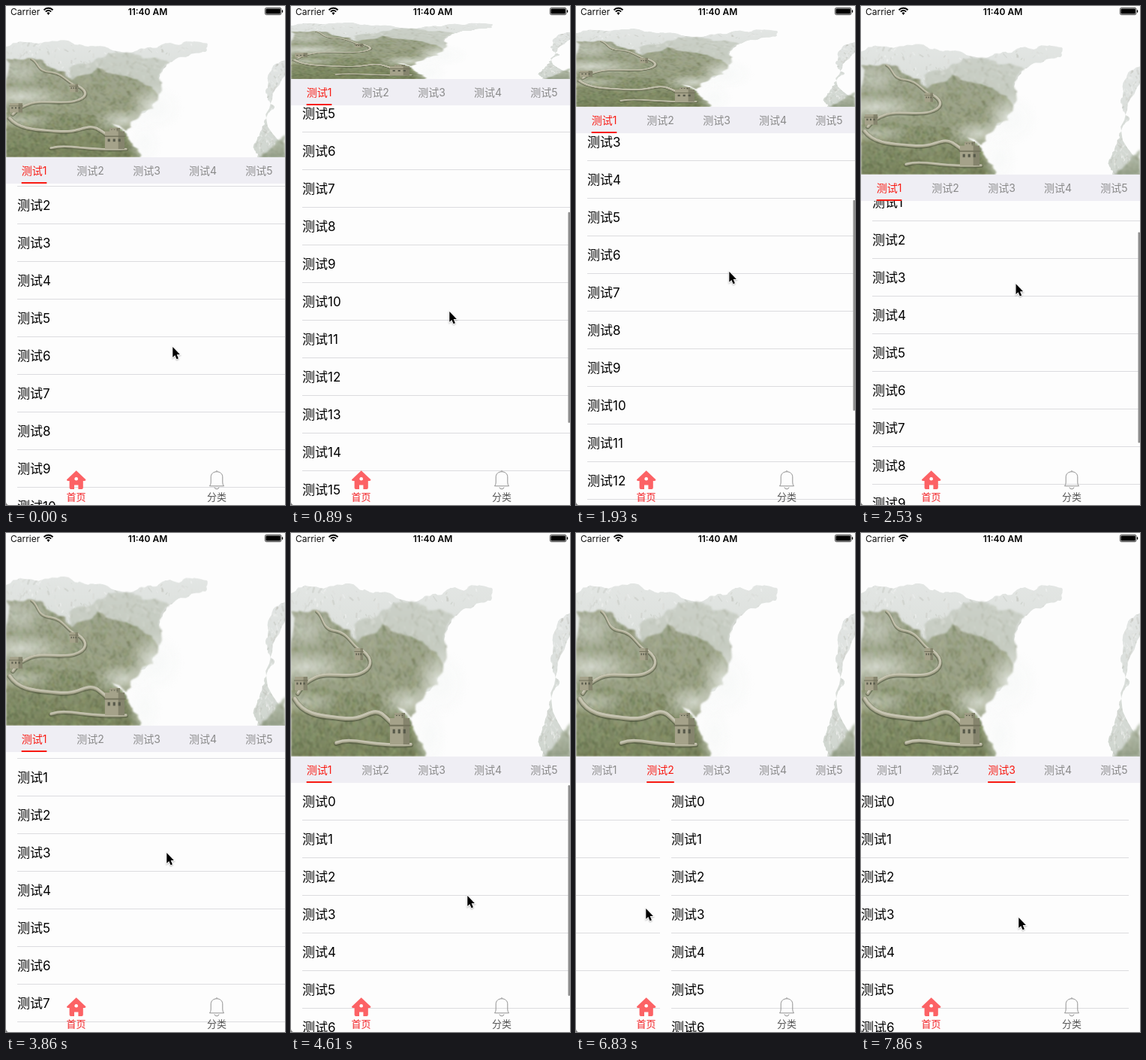
An HTML page with a canvas that plays this animation: 372x663 px, repeating every 8000 ms.

```html
<!DOCTYPE html>
<html lang="zh-CN">
<head>
<meta charset="utf-8">
<style>
html, body { margin: 0; width: 372px; height: 663px; overflow: hidden; background: #fdfdfd; }
canvas { display: block; }
</style>
</head>
<body>
<canvas id="stage" width="372" height="663"></canvas>
<script>
const W = 372, HT = 663, LOOP = 8000, STEP = 148.4;
const HEAD = 297, HEAD_MIN = 97, BAR = 35, ROW = 50, ROWS = 20, PAGES = 3;
const FONT = 'Inter, "Noto Sans CJK SC", "Noto Sans CJK", sans-serif';
const BG = '#fdfdfd', RED = '#f81a12';
const ctx = document.getElementById('stage').getContext('2d');

// resting points of the list and of the hand: step, then values
const SCROLL = [[0, 96.5], [6, 264], [13, 163], [19, 41.5], [26, 41.5], [31, 0]];
const POINTER = [[0, 222, 453], [6, 211, 406], [13, 204, 353], [26, 214, 425], [31, 235, 482],
  [34, 115, 485], [39, 211, 482], [44, 264, 524], [46, 93, 499], [52, 226, 514], [53, 210, 511]];
const FLICKS = [32, 44, 52.3];

function at(keys, k, i = 1) {
  const n = keys.findIndex(key => key[0] >= k);
  if (n < 0) return keys[keys.length - 1][i];
  if (n === 0) return keys[0][i];
  const a = keys[n - 1], b = keys[n], u = (k - a[0]) / (b[0] - a[0]);
  return a[i] + (b[i] - a[i]) * u * u * (3 - 2 * u);
}

// a page flick: slow pull, quick throw, soft landing
const flick = n => n <= 0 ? 0 : 1 / (1 + Math.exp(-3.1 * (n - 1.73)));

function rect(x, y, w, h, color) {
  ctx.fillStyle = color;
  ctx.fillRect(x, y, w, h);
}

function text(s, x, y, size, color, align = 'left', weight = 400) {
  ctx.font = `${weight} ${size}px ${FONT}`;
  ctx.textAlign = align;
  ctx.fillStyle = color;
  ctx.fillText(s, x, y);
}

function sheet() {
  const cv = document.createElement('canvas');
  cv.width = W;
  cv.height = HEAD;
  return cv.getContext('2d');
}

function paintScene() {
  const g = sheet();
  let seed = 41;
  const rnd = () => (seed = (seed * 16807) % 2147483647) / 2147483647;

  // outline roughened by repeated midpoint displacement
  function rough(pts, amount) {
    for (let pass = 0; pass < 4; pass++) {
      pts = pts.flatMap(([x, y], i) => {
        const [nx, ny] = pts[(i + 1) % pts.length];
        const d = amount * Math.hypot(nx - x, ny - y);
        return [[x, y], [(x + nx) / 2 + (rnd() - .5) * d, (y + ny) / 2 + (rnd() - .5) * d]];
      });
    }
    const p = new Path2D();
    pts.forEach(([x, y]) => p.lineTo(x, y));
    p.closePath();
    return p;
  }

  function hill(pts, { top, bottom, light, sat, dabs, blur = .6 }) {
    const l = sheet();
    const ys = pts.map(p => p[1]), y0 = Math.min(...ys), y1 = Math.max(...ys);
    const xs = pts.map(p => p[0]), x0 = Math.min(...xs), x1 = Math.max(...xs);
    const fill = l.createLinearGradient(0, y0, 0, y1);
    fill.addColorStop(0, top);
    fill.addColorStop(1, bottom);
    const path = rough(pts, .32);
    l.fillStyle = fill;
    l.fill(path);
    l.clip(path);
    l.lineCap = 'round';
    for (let i = 0; i < dabs; i++) {
      const x = x0 + rnd() * (x1 - x0), y = y0 + rnd() * (y1 - y0);
      const a = .6 + rnd() * 1.7, len = 1 + rnd() * 7;
      l.strokeStyle = `hsla(${58 + rnd() * 40},${sat}%,${light + (rnd() - .5) * 36}%,.3)`;
      l.lineWidth = .8 + rnd() * 2;
      l.beginPath();
      l.moveTo(x, y);
      l.lineTo(x + Math.cos(a) * len, y + Math.sin(a) * len);
      l.stroke();
    }
    g.filter = `blur(${blur}px)`;
    g.drawImage(l.canvas, 0, 0);
    g.filter = 'none';
  }

  function mist(x, y, rx, ry, alpha) {
    g.save();
    g.translate(x, y);
    g.scale(rx, ry);
    const f = g.createRadialGradient(0, 0, 0, 0, 0, 1);
    f.addColorStop(0, `rgba(246,248,247,${alpha})`);
    f.addColorStop(1, 'rgba(246,248,247,0)');
    g.fillStyle = f;
    g.fillRect(-1, -1, 2, 2);
    g.restore();
  }

  function wall(d, w) {
    const p = new Path2D(d);
    g.lineCap = 'round';
    ['rgba(80,86,64,.6)', '#a9a78f', '#c6c4b1'].forEach((color, i) => {
      g.strokeStyle = color;
      g.lineWidth = w * (1.4 - i * .4);
      g.save();
      g.translate(0, 1 - i);
      g.stroke(p);
      g.restore();
    });
  }

  function tower(x, y, w, h) {
    rectOn('#a5a28a', 0, 0, 1, 1);
    rectOn('#85846d', .68, 0, .32, 1);
    rectOn('#74735d', -.06, .25, 1.12, .06);
    for (let i = 0; i < 3; i++) rectOn('#57594a', .14 + i * .27, .42, .12, .16);
    function rectOn(color, u, v, du, dv) {
      g.fillStyle = color;
      g.fillRect(x + u * w, y + v * h, du * w, dv * h);
    }
  }

  hill([[0, 80], [73, 67], [120, 79], [178, 84], [212, 73], [268, 73], [266, 90], [215, 113], [203, 165], [185, 210], [0, 200]],
    { top: '#e3e6e4', bottom: '#d3d8d2', light: 84, sat: 6, dabs: 500 });
  hill([[84, 122], [130, 101], [166, 92], [218, 112], [203, 140], [198, 185], [84, 185]],
    { top: '#cbd0c8', bottom: '#c3c9bd', light: 76, sat: 9, dabs: 400, blur: 1 });
  hill([[0, 104], [33, 102], [62, 122], [88, 146], [122, 121], [152, 136], [188, 156], [203, 175], [196, 202], [168, 226], [160, 245], [0, 245]],
    { top: '#a3a894', bottom: '#969d80', light: 50, sat: 18, dabs: 2600, blur: .9 });
  mist(15, 128, 45, 30, .4);
  mist(20, 178, 65, 24, .6);
  mist(200, 200, 38, 48, .8);
  hill([[0, 208], [38, 204], [105, 210], [140, 228], [160, 250], [176, 280], [180, 299], [0, 299]],
    { top: '#99a084', bottom: '#77815c', light: 43, sat: 21, dabs: 2200, blur: .8 });
  mist(22, 225, 45, 17, .4);
  mist(155, 225, 42, 24, .6);
  mist(185, 270, 24, 45, .75);

  g.filter = 'blur(.5px)';
  wall('M34 104C45 112 40 127 58 130S78 145 91 155', 2.5);
  wall('M95 156C112 169 107 181 91 187S48 184 32 192S16 203 9 213', 4);
  wall('M5 220C18 244 45 243 68 246S99 240 110 238S126 245 137 255', 5);
  wall('M60 279C85 270 105 285 160 281', 4);
  tower(85, 153, 11, 16);
  tower(5, 191, 17, 18);
  tower(132, 246, 26, 35);
  tower(138, 239, 14, 7);
  g.filter = 'none';

  hill([[374, 104], [359, 114], [350, 150], [358, 200], [345, 232], [331, 270], [336, 299], [374, 299]],
    { top: '#e3e6e5', bottom: '#cfd5ce', light: 84, sat: 6, dabs: 350 });
  hill([[374, 250], [357, 274], [338, 299], [374, 299]],
    { top: '#c0c8b9', bottom: '#8f9a83', light: 60, sat: 12, dabs: 140, blur: 1.5 });
  return g.canvas;
}
const scene = paintScene();

function drawStatus() {
  text('Carrier', 6, 11.5, 12, '#111');
  text('11:40 AM', 189, 11.5, 12, '#000', 'center', 600);
  ctx.strokeStyle = '#000';
  ctx.lineWidth = 1.9;
  for (const r of [8.2, 5]) {
    ctx.beginPath();
    ctx.arc(56.5, 11, r, -Math.PI * .76, -Math.PI * .24);
    ctx.stroke();
  }
  ctx.fillStyle = '#000';
  ctx.beginPath();
  ctx.moveTo(56.5, 12);
  ctx.arc(56.5, 11, 2.6, -Math.PI * .78, -Math.PI * .22);
  ctx.fill();
  ctx.lineWidth = .7;
  ctx.beginPath();
  ctx.roundRect(345.4, 2.4, 21.6, 9.2, 2);
  ctx.stroke();
  ctx.beginPath();
  ctx.roundRect(346.4, 3.4, 19.6, 7.2, 1);
  ctx.roundRect(367.8, 5.3, 1.4, 3.4, .7);
  ctx.fill();
}

function drawPage(x, top) {
  for (let i = 0; i < ROWS; i++) {
    const y = top + i * ROW;
    text('测试' + i, x + 15, y + 31, 17, '#000');
    rect(x + 15, y + ROW - 1, W - 15, 1, '#dcdcdf');
  }
}

function drawTabs(y, active) {
  rect(0, y, W, BAR, '#efeef4');
  for (let i = 0; i < 5; i++) {
    const x = 37.5 + 75 * i, label = '测试' + (i + 1);
    text(label, x, y + 23, 14, i === active ? RED : '#8a8a8a', 'center');
    if (i === active) {
      const w = ctx.measureText(label).width;
      rect(x - w / 2, y + 33, w, 2, RED);
    }
  }
}

function drawFooter() {
  ctx.fillStyle = '#fc6265';
  ctx.fill(new Path2D('M93.7 617.2L106.4 629.2Q106.8 631 104.5 631H102.8V640Q102.8 642 101 642H96.4V636.5H91V642H86.4Q84.6 642 84.6 640V631H82.8Q80.6 631 81 629.2Z'));
  ctx.fillStyle = '#fff';
  ctx.beginPath();
  ctx.arc(93.7, 628.3, 2.3, 0, 7);
  ctx.fill();
  text('首页', 93.5, 656.7, 13, '#f3262a', 'center', 500);

  ctx.strokeStyle = '#929292';
  ctx.lineWidth = 1;
  ctx.stroke(new Path2D('M271.5 637.8H290.5Q288.8 636 288.8 633V626C288.8 621.5 285.5 618.8 281 618.8S273.2 621.5 273.2 626V633Q273.2 636 271.5 637.8ZM279.8 618.6Q281 616.2 282.2 618.6M278 639.5Q278.4 641.8 281 641.8T284 639.5'));
  text('分类', 281, 656.7, 13, '#555', 'center');
  ctx.fillStyle = '#777';
  ctx.fill(new Path2D('M0 659.5Q.6 662.4 3 663H0Z'));
}

const arrow = new Path2D('M0 0V13.8L3 10.9L5.3 16.2L7.6 15.2L5.4 10.1H9.6Z');
function drawPointer(x, y) {
  ctx.save();
  ctx.translate(x + .3, y);
  ctx.shadowColor = 'rgba(0,0,0,.3)';
  ctx.shadowBlur = 2;
  ctx.shadowOffsetY = 1;
  ctx.strokeStyle = '#fff';
  ctx.lineWidth = 1.6;
  ctx.stroke(arrow);
  ctx.shadowColor = 'transparent';
  ctx.fillStyle = '#000';
  ctx.fill(arrow);
  ctx.restore();
}

function draw(ms) {
  const k = Math.floor((ms + 8) / STEP);
  const off = at(SCROLL, k);
  const swipe = Math.round(W * FLICKS.reduce((sum, from) => sum + flick(k - from), 0));
  const tab = FLICKS.filter(from => k >= from + 5).length;
  const head = Math.round(Math.max(HEAD_MIN, HEAD - off)), top = head + BAR;

  rect(0, 0, W, HT, BG);
  ctx.save();
  ctx.beginPath();
  ctx.rect(0, top, W, HT - top);
  ctx.clip();
  for (let p = 0; p < PAGES; p++) drawPage(p * W - swipe, Math.round(top - off));

  // the scroll thumb shows only while the list moves
  ctx.globalAlpha = Math.min(1, Math.abs(off - at(SCROLL, k - 2)));
  ctx.fillStyle = '#8e8e8e';
  ctx.beginPath();
  ctx.roundRect(369.5, top + 3 + off * .526, 2.5, 280, 1.2);
  ctx.fill();
  ctx.restore();

  ctx.drawImage(scene, 0, 0, W, head);
  drawTabs(head, tab);
  drawStatus();
  drawFooter();
  drawPointer(at(POINTER, k, 1), at(POINTER, k, 2));
}

const start = performance.now();
function frame() {
  draw((performance.now() - start) % LOOP);
  requestAnimationFrame(frame);
}
draw(0);
requestAnimationFrame(frame);
</script>
</body>
</html>
```
